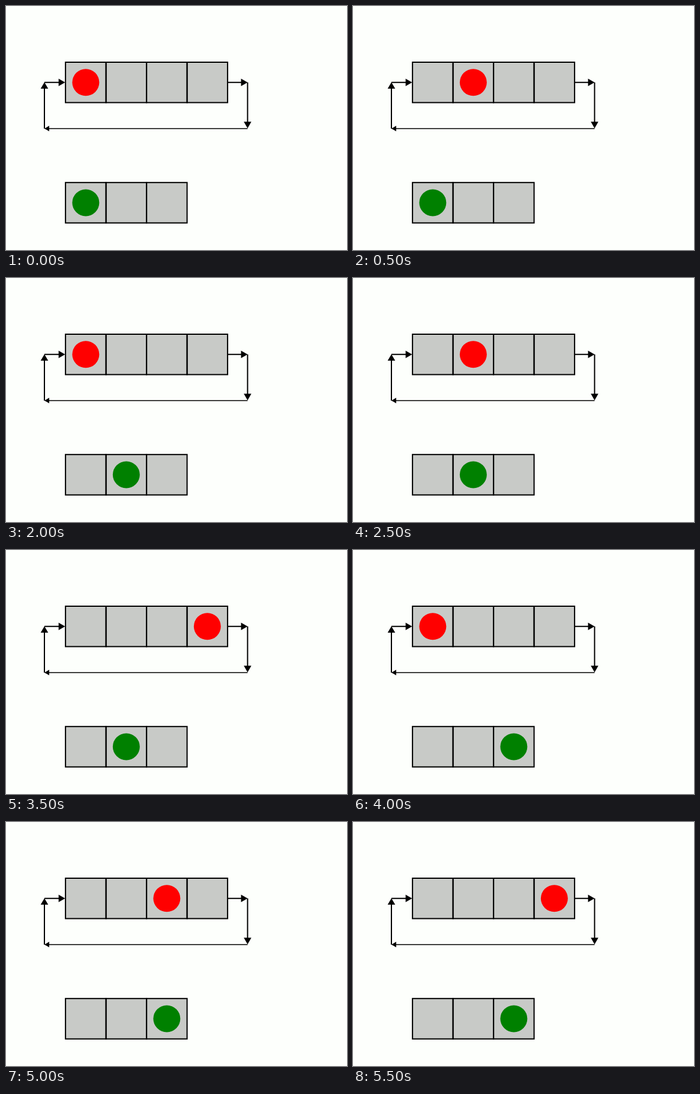
Animation of 568 by 408 pixels, one loop 7500 ms. Source, as an HTML page with a canvas:

```html
<!DOCTYPE html>
<html lang="en">
<head>
<meta charset="utf-8">
<title>Nested cycles</title>
<style>
html, body { margin: 0; width: 100%; height: 100%; overflow: hidden; background: #fdfffc; }
canvas { display: block; }
</style>
</head>
<body>
<canvas id="stage" width="568" height="408"></canvas>
<script>
const ctx = document.getElementById('stage').getContext('2d');
const CELL = 67.5, LEFT = 99.1, TOP = 94, BOTTOM = 295.2;
const COLS = 4, ROWS = 3;
const STEP = 500, LOOP = 7500;

// A row of cells with one disc in it
function row(y, count, active, color) {
  ctx.lineWidth = 2;
  ctx.fillStyle = '#c8cac7';
  ctx.fillRect(LEFT, y, count * CELL, CELL);
  for (let i = 0; i < count; i++) ctx.strokeRect(LEFT + i * CELL, y, CELL, CELL);
  ctx.fillStyle = color;
  ctx.beginPath();
  ctx.arc(LEFT + (active + 0.5) * CELL, y + CELL / 2, CELL / 3, 0, Math.PI * 2);
  ctx.fill();
}

// Line with an equilateral head that scales with its width
function arrow(x1, y1, x2, y2, width = 2) {
  const size = Math.hypot(x2 - x1, y2 - y1);
  const head = 5.45 * width, half = head / Math.sqrt(3);
  ctx.save();
  ctx.translate(x1, y1);
  ctx.rotate(Math.atan2(y2 - y1, x2 - x1));
  ctx.lineWidth = width;
  ctx.fillStyle = '#000';
  ctx.beginPath();
  ctx.moveTo(0, 0);
  ctx.lineTo(size - head + 1, 0);
  ctx.stroke();
  ctx.beginPath();
  ctx.moveTo(size, 0);
  ctx.lineTo(size - head, -half);
  ctx.lineTo(size - head, half);
  ctx.fill();
  ctx.restore();
}

function returnPath() {
  const x1 = 64, x2 = 402.4, y1 = TOP + CELL / 2, y2 = 204.9;
  arrow(x1, y1, LEFT - 0.6, y1);
  arrow(LEFT + COLS * CELL, y1, x2, y1);
  arrow(x2, y1, x2, y2 - 0.5);
  arrow(x2, y2, x1, y2, 1.47);
  arrow(x1, y2, x1, y1 - 0.3);
}

function draw(time) {
  const step = Math.min(COLS * ROWS - 1, Math.floor((time % LOOP) / STEP));
  ctx.fillStyle = '#fdfffc';
  ctx.fillRect(0, 0, 568, 408);
  ctx.strokeStyle = '#000';
  row(TOP, COLS, step % COLS, '#f00');
  row(BOTTOM, ROWS, Math.floor(step / COLS), '#008000');
  returnPath();
}

function tick() {
  draw(performance.now());
  requestAnimationFrame(tick);
}
tick();
</script>
</body>
</html>
```
